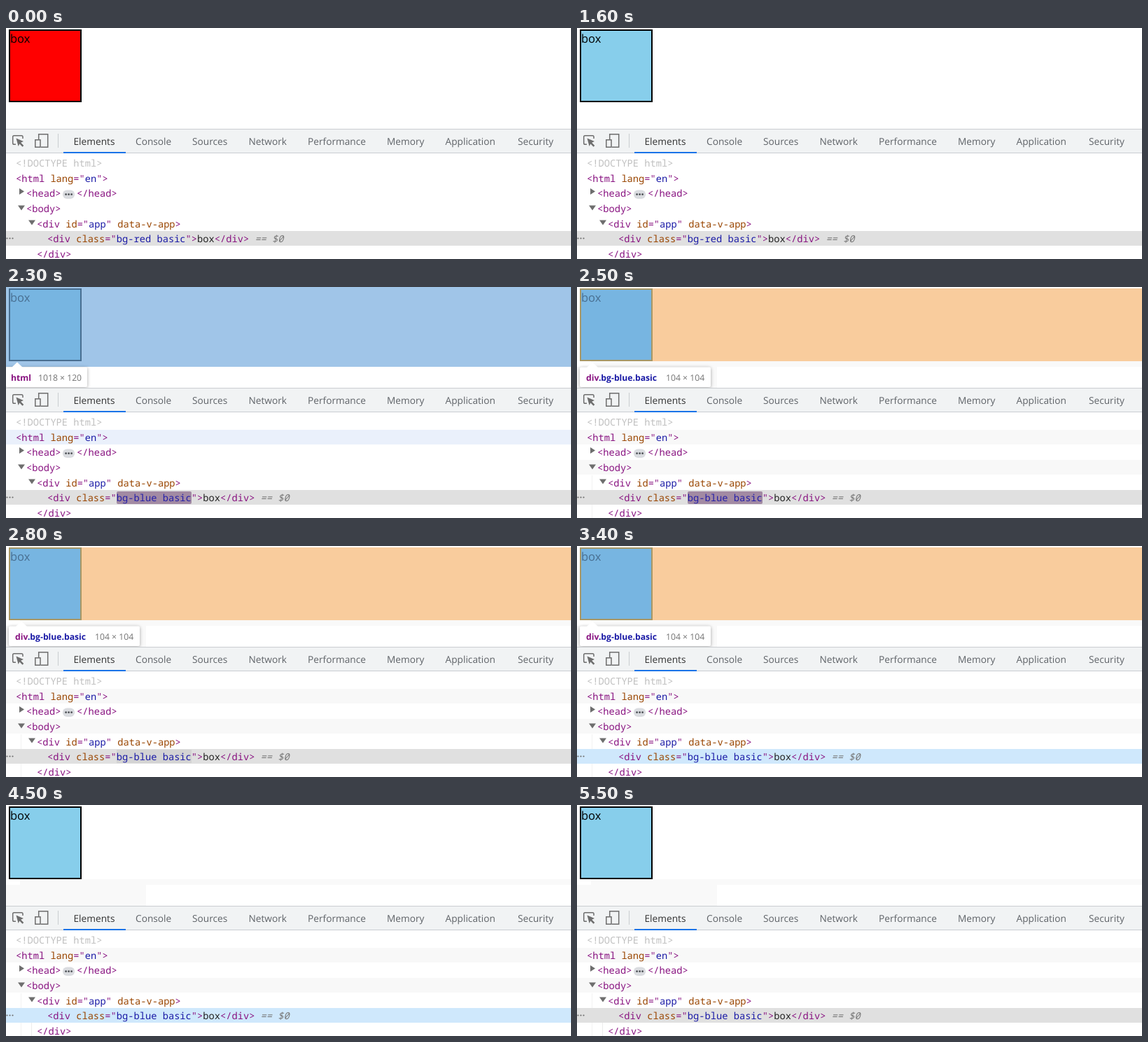
An HTML page with a canvas that plays this animation: 807 by 330 pixels, repeating every 5700 ms.

```html
<!DOCTYPE html>
<html lang="en">
<head>
<meta charset="utf-8">
<title>Class binding in the inspector</title>
<style>
  html, body { margin: 0; width: 100%; height: 100%; overflow: hidden; background: #fff; }
  canvas, svg { position: absolute; left: 0; top: 0; width: 807px; height: 330px; }
  text { white-space: pre; text-rendering: geometricPrecision; }
  .ui { font: 13.7px "Open Sans", "Noto Sans", sans-serif; fill: #5f6368; }
  .page { font: 16.5px "Open Sans", "Noto Sans", sans-serif; }
  .tip { font: 12.2px "Open Sans", "Noto Sans", sans-serif; fill: #737373; }
  .tip .tag, .tip .id { font-weight: 700; }
  .code { font: 13.72px "Noto Sans Mono", "DejaVu Sans Mono", monospace; fill: #222; }
  .tag { fill: #881280; }
  .attr { fill: #994500; }
  .val, .id { fill: #1a1aa6; }
  .doc { fill: #c0c0c0; }
  .hint { fill: #777; font-style: italic; }
</style>
</head>
<body>
<canvas id="stage" width="807" height="330"></canvas>
<svg id="labels" viewBox="0 0 807 330"></svg>
<script>
const LOOP = 5700;
const c = document.getElementById('stage').getContext('2d');
const labels = document.getElementById('labels');
const NS = 'http://www.w3.org/2000/svg';

// Each part is [text, class].
function label(x, y, cls, parts) {
  const el = document.createElementNS(NS, 'text');
  el.setAttribute('x', x);
  el.setAttribute('y', y);
  el.setAttribute('class', cls);
  el.spans = parts.map(([str, kind]) => {
    const span = document.createElementNS(NS, 'tspan');
    span.textContent = str;
    if (kind) span.setAttribute('class', kind);
    return el.appendChild(span);
  });
  return labels.appendChild(el);
}

const boxText = label(6, 21, 'page', [['box']]);

[['Elements', 96.5], ['Console', 185], ['Sources', 266], ['Network', 346.5],
 ['Performance', 431], ['Memory', 544], ['Application', 627.5], ['Security', 731]]
  .forEach(([name, x], i) => {
    const tab = label(x, 167, 'ui', [[name]]);
    if (!i) tab.style.fill = '#333';
  });

label(14, 198, 'code', [['<!DOCTYPE html>', 'doc']]);
label(14, 219.5, 'code', [['<html ', 'tag'], ['lang', 'attr'], ['="', 'tag'], ['en', 'val'], ['">', 'tag']]);
label(29, 241, 'code', [['<head>', 'tag']]);
label(101, 241, 'code', [['</head>', 'tag']]);
label(29, 263, 'code', [['<body>', 'tag']]);
label(44, 284.5, 'code', [['<div ', 'tag'], ['id', 'attr'], ['="', 'tag'], ['app', 'val'], ['" ', 'tag'],
  ['data-v-app', 'attr'], ['>', 'tag']]);
const value = label(59, 306, 'code', [['<div ', 'tag'], ['class', 'attr'], ['="', 'tag'], ['', 'val'],
  ['">', 'tag'], ['box'], ['</div>', 'tag'], [' == $0', 'hint']]).spans[3];
label(44, 328, 'code', [['</div>', 'tag']]);

const CONTENT = '#a0c5e8', MARGIN = '#f9cc9d', DIM = '#496f91';

// Inspected nodes: tooltip geometry and highlighted areas.
const nodes = {
  html: { x: 0, w: 116, tip: 16, sizeX: 46, row: 204, name: [['html', 'tag']], size: '1018 × 120',
    areas: [[0, 0, 807, 114, CONTENT]] },
  body: { x: 4, w: 121, tip: 22, sizeX: 54, row: 247, guide: [21, 269], name: [['body', 'tag']], size: '1002 × 104',
    areas: [[0, 0, 807, 114, MARGIN], [4, 2, 803, 104, CONTENT]] },
  app: { x: 4, w: 140, tip: 22, sizeX: 73, row: 269, guide: [36, 291], name: [['div', 'tag'], ['#app', 'id']],
    size: '1002 × 104', areas: [[4, 2, 803, 104, CONTENT]] },
  box: { x: 4, w: 187, tip: 22, sizeX: 127, name: [['div', 'tag'], ['.bg-blue.basic', 'id']],
    size: '104 × 104', areas: [[4, 2, 803, 104, MARGIN]], border: '#a89765' }
};
for (const n of Object.values(nodes)) {
  n.texts = [label(n.x ? 13 : 7, 134, 'tip', n.name), label(n.sizeX, 134, 'tip', [[n.size]])];
}

function hovered(t) {
  if (t < 2200) return null;
  if (t < 2400) return nodes.html;
  if (t < 2500) return nodes.body;
  if (t < 4300) return nodes.box;
  return t < 4400 ? nodes.app : null;
}

function rect(x, y, w, h, fill) {
  c.fillStyle = fill;
  c.fillRect(x, y, w, h);
}

function round(x, y, w, h, r, fill) {
  c.fillStyle = fill;
  c.beginPath();
  c.roundRect(x, y, w, h, r);
  c.fill();
}

function poly(fill, ...p) {
  c.fillStyle = fill;
  c.beginPath();
  for (let i = 0; i < p.length; i += 2) c.lineTo(p[i], p[i + 1]);
  c.fill();
}

function dots(x, y, step, r, fill) {
  c.fillStyle = fill;
  for (let i = 0; i < 3; i++) {
    c.beginPath();
    c.arc(x + i * step, y, r, 0, 7);
    c.fill();
  }
}

function mix(a, b, k) {
  return `rgb(${a.map((v, i) => Math.round(v + (b[i] - v) * k))})`;
}

function drawPage(t, node) {
  if (t >= 2400) {
    rect(20, 106, 787, 8, '#f9f9f9');
    rect(0, 114, 200, 30, '#f9f9f9');
  }
  if (node) node.areas.forEach(a => rect(...a));
  rect(4, 2, 104, 104, node ? node.border || DIM : '#000');
  rect(6, 4, 100, 100, t < 1600 ? '#f00' : node ? '#77b5e1' : '#87ceeb');
  boxText.style.fill = node ? DIM : '#000';
  if (!node) return;
  c.save();
  c.shadowColor = 'rgba(0,0,0,.35)';
  c.shadowBlur = 5;
  c.shadowOffsetY = 1;
  round(node.x, 114.5, node.w, 28.5, 2, '#fff');
  c.restore();
  poly('#fff', node.tip - 8, 115, node.tip, 107.5, node.tip + 8, 115);
}

function drawToolbar() {
  rect(0, 144, 807, 35, '#cacdd1');
  rect(0, 145, 807, 33, '#f1f3f4');
  rect(82, 177, 89, 2, '#1a73e8');
  rect(74, 151, 1, 20, '#cacdd1');
  c.strokeStyle = '#6e6e6e';
  c.lineWidth = 1.5;
  c.stroke(new Path2D('M24 158V155.5Q24 153.7 22.2 153.7H11.5Q9.7 153.7 9.7 155.5V164.5Q9.7 166.3 11.5 166.3H14'));
  poly('#6e6e6e', 14.5, 157.5, 25, 162, 21.2, 163.8, 25.3, 168, 23.5, 169.8, 19.4, 165.6, 17.6, 169);
  c.strokeRect(46.7, 151.8, 13, 18.4);
  rect(41, 159, 9, 12, '#f1f3f4');
  c.strokeRect(41.8, 159.8, 7.2, 10.4);
}

function drawTree(t, node) {
  if (t >= 2400) rect(0, 204, 807, 21, '#f8f8f8');
  if (t >= 2500) {
    rect(0, 247, 807, 21, '#f8f8f8');
    rect(21, 269, 1, 61, '#f3f3f3');
  }
  if (node && node.row) rect(0, node.row, 807, 21, '#eaf0fb');
  rect(0, 290, 807, 21, t >= 3400 && t < 5500 ? '#cfe8fc' : '#e0e0e0');
  if (t >= 4400) rect(36, 311, 1, 19, '#ececec');
  if (node && node.guide) rect(node.guide[0], node.guide[1], 1, 330 - node.guide[1], '#d5d9df');

  const grey = '#6e6e6e';
  poly(grey, 19, 229, 26, 233.5, 19, 238);
  poly(grey, 17, 253.5, 27, 253.5, 22, 260.5);
  poly(grey, 32, 274.5, 42, 274.5, 37, 281.5);
  round(81, 231.5, 17, 12.5, 6, '#dadce0');
  dots(85.6, 237.7, 4, 1.4, '#4d5156');
  dots(1.5, 300.5, 4, 1.1, grey);

  // The changed attribute flashes, then fades.
  const k = Math.min(1, Math.max(0, (t - 1700) / 600));
  const flash = t >= 1700 && t < 2800;
  if (flash) round(158, 292, 107, 18, 2, mix([158, 54, 153], [162, 138, 163], k));
  else if (t >= 2800 && t < 3400) rect(158, 291, 107, 19, '#d3d3d3');
  value.textContent = t < 1700 ? 'bg-red basic' : 'bg-blue basic';
  value.style.fill = flash ? mix([255, 255, 255], [38, 32, 168], k) : '';
}

function draw(now) {
  const t = Math.floor((now % LOOP) / 100) * 100;
  const node = hovered(t);
  rect(0, 0, 807, 330, '#fff');
  drawPage(t, node);
  drawToolbar();
  drawTree(t, node);
  for (const n of Object.values(nodes)) {
    n.texts.forEach(el => { el.style.display = n === node ? '' : 'none'; });
  }
}

const start = performance.now();
function tick() {
  draw(performance.now() - start);
  requestAnimationFrame(tick);
}
tick();
</script>
</body>
</html>
```
